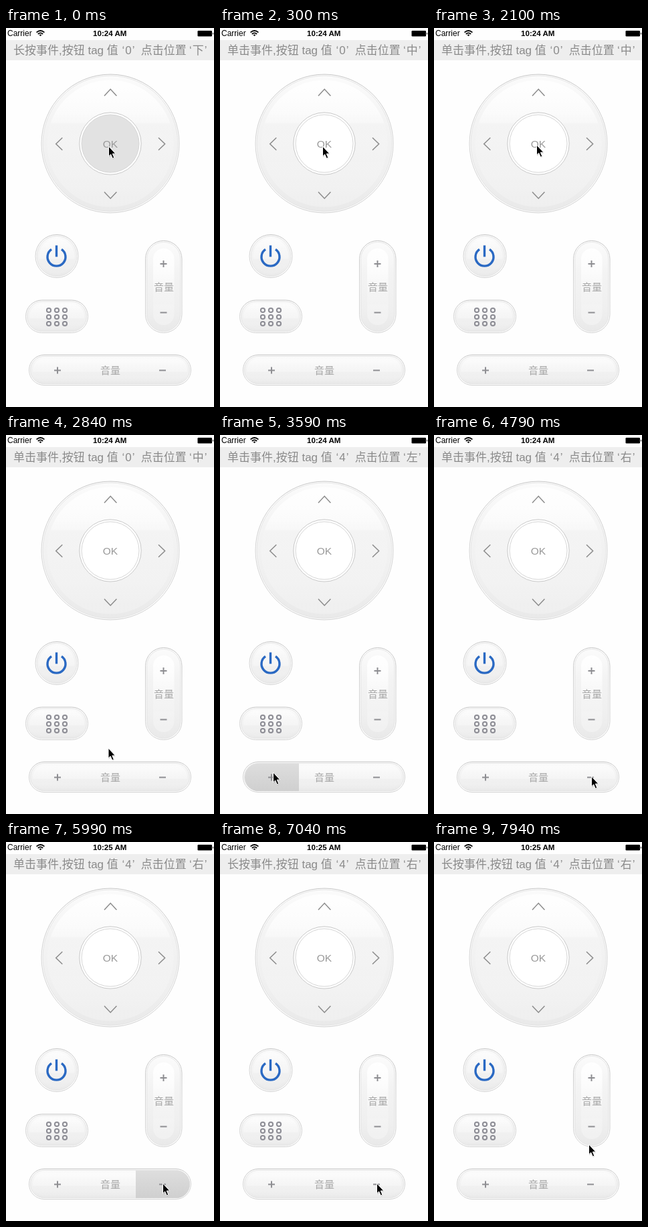
An HTML page that plays this animation: 311x564 px, repeating every 8000 ms.

```html
<!DOCTYPE html>
<html lang="zh-CN">
<head>
<meta charset="utf-8">
<title>Remote control</title>
<style>
html, body { margin: 0; width: 100%; height: 100%; overflow: hidden; background: #fefefe; }
svg { display: block; font-family: "Liberation Sans", "Noto Sans CJK SC", "Noto Sans CJK", sans-serif; }
.line { fill: none; stroke: #8c8c8c; stroke-width: 1.5; }
.sign { fill: none; stroke: #8e8e92; stroke-width: 2; }
.volume { font-size: 15px; fill: #a9a9a9; text-anchor: middle; }
.label { font-size: 17px; fill: #8a8a8a; white-space: pre; }
.quoted { letter-spacing: 1px; }
</style>
</head>
<body>
<svg id="stage" width="311" height="564" viewBox="0 0 311 564"></svg>
<script>
const LOOP = 8000;

// Raised button: thin rim, white gap, shaded body and a soft highlight.
function button(x, y, w, h, inset, glow) {
  const box = (gap, attrs) => {
    const bw = w - 2 * gap, bh = h - 2 * gap;
    return `<rect x="${x + gap}" y="${y + gap}" width="${bw}" height="${bh}" rx="${Math.min(bw, bh) / 2}" ${attrs}/>`;
  };
  return box(.5, 'fill="#fff" stroke="url(#rim)"') +
    box(2.5, 'fill="url(#body)" stroke="#dedede" stroke-width=".8"') +
    box(inset, `fill="url(#${glow})"`);
}
const plus = (x, y) => `<path class="sign" d="M${x - 5} ${y}h10M${x} ${y - 5}v10"/>`;
const minus = (x, y) => `<path class="sign" d="M${x - 5} ${y}h10"/>`;
const volume = (x, y) => `<text class="volume" x="${x}" y="${y}">音量</text>`;
const gradient = (id, stops) => `<linearGradient id="${id}" x2="0" y2="1">` +
  stops.map(([at, color, alpha = 1]) => `<stop offset="${at}" stop-color="${color}" stop-opacity="${alpha}"/>`).join('') +
  '</linearGradient>';

let dots = '';
for (let i = 0; i < 9; i++) {
  dots += `<circle cx="${64 + i % 3 * 12}" cy="${420 + Math.floor(i / 3) * 10}" r="3.1"/>`;
}

const stage = document.getElementById('stage');
stage.innerHTML = `
<defs>
  ${gradient('rim', [[0, '#c4c4c4'], [.5, '#d2d2d2'], [1, '#d0d0d0']])}
  ${gradient('body', [[0, '#fbfbfb'], [.35, '#f3f3f3'], [.75, '#efefef'], [1, '#e9e9e9']])}
  ${gradient('dialGlow', [[0, '#fff', .9], [.25, '#fff', .6], [.33, '#fff', .4], [.35, '#fff', .1], [1, '#fff', .25]])}
  ${gradient('barGlow', [[0, '#fff', .5], [.55, '#fff', .3], [.6, '#fff', 0], [1, '#fff', .1]])}
  ${gradient('tallGlow', [[0, '#fff', .95], [.3, '#fff', .7], [.6, '#fff', .2], [1, '#fff', .3]])}
  ${gradient('held', [[0, '#dedede'], [.4, '#d8d8d8'], [1, '#cfcfcf']])}
  <clipPath id="bar"><rect x="37" y="488.5" width="238" height="41.5" rx="20.7"/></clipPath>
</defs>
<rect width="311" height="564" fill="#fefefe"/>
<text x="2" y="12.3" font-size="12">Carrier</text>
<g fill="none" stroke="#000" stroke-width="1.8">
  <path d="M45.6 6.6Q51.5 1.4 57.4 6.6M47.8 9Q51.5 5.8 55.2 9"/>
  <path d="M49.6 10.2Q51.5 8.8 53.4 10.2L51.5 12.3Z" fill="#000" stroke="none"/>
</g>
<text id="clock" x="130" y="12.3" font-size="11.6" font-weight="bold"></text>
<rect x="286.5" y="4" width="21.5" height="8.5" rx="1.3"/>
<path d="M309 6.5q2 1.8 0 3.6z"/>
<rect y="18" width="311" height="30" fill="#eee"/>
<text id="event" class="label" x="11" y="39"></text>
<text id="tag" class="label quoted" x="173.5" y="39"></text>
<text class="label" x="201.7" y="39">点击位置</text>
<text id="place" class="label quoted" x="274" y="39"></text>

${button(52.5, 68.5, 207, 207, 9, 'dialGlow')}
<circle cx="156" cy="172" r="46.2" fill="#fff" stroke="#c8c8c8"/>
<circle id="center" cx="156" cy="172" r="43" fill="#fff" stroke="#d6d6d6"/>
<path class="line" d="M147 101l9.2-10 9.2 10M147 244l9.2 9.7 9.2-9.7M84.3 163.3l-9.6 9.2 9.6 9.2M228 163.3l9.6 9.2-9.6 9.2"/>
<text x="156" y="178" font-size="15.5" fill="#999" text-anchor="middle">OK</text>

${button(43.5, 307, 65, 65, 6, 'barGlow')}
<path d="M68 329.4A13.5 13.5 0 1 0 83 329.4M75.5 323.5v17" fill="none" stroke="#2a69c3" stroke-width="3.4"/>

${button(29, 404.5, 94, 49.5, 6, 'barGlow')}
<g fill="none" stroke="#8d8d95" stroke-width="2">${dots}</g>

${button(208, 316, 55.5, 138, 12, 'tallGlow')}
${plus(235.5, 351)}${volume(236, 391)}${minus(235.5, 423.5)}

${button(34, 486, 243, 46, 6, 'barGlow')}
<g clip-path="url(#bar)" fill="url(#held)">
  <rect id="left" x="37" y="488" width="81" height="43"/>
  <rect id="right" x="194" y="488" width="82" height="43"/>
</g>
${plus(77, 509.5)}${volume(156, 514.7)}${minus(234, 509.5)}

<g id="cursor">
  <path d="M.5 1v14.3l3.2-2.9 2.5 5.6 2.5-1-2.4-5.5h4.4z" fill="#000" opacity=".2" transform="translate(.5 1)"/>
  <path d="M.5 0v15l3.2-3 2.6 6 2.5-1-2.5-5.9h4.5z" stroke="#fff"/>
</g>`;

// [time, x, y] of the pointer
const pointer = [
  [0, 153, 176], [1200, 155, 173], [1350, 153, 171], [2100, 153, 174], [2250, 153, 176],
  [2550, 154, 250], [2700, 154, 400], [2840, 152.5, 466], [2990, 104, 496], [3140, 79, 502],
  [3890, 126, 506], [4040, 212, 509], [4190, 235, 508], [5240, 234, 508],
  [7790, 233, 478], [7940, 231, 450]
];
// [time, held part]
const holds = [
  [0, 'center'], [150, ''], [3290, 'left'], [3440, ''], [3590, 'left'], [3740, ''],
  [4490, 'right'], [4790, ''], [5540, 'right'], [7040, '']
];
// [time, event, tag, position]
const messages = [
  [0, '长按', 0, '下'], [150, '单击', 0, '中'], [3440, '单击', 4, '左'],
  [4790, '单击', 4, '右'], [7040, '长按', 4, '右']
];
const clocks = [[0, '10:24 AM'], [5990, '10:25 AM']];

const at = (steps, t) => steps.findLast(step => step[0] <= t);
const el = id => document.getElementById(id);
function setText(id, text) {
  if (el(id).textContent !== text) el(id).textContent = text;
}

function draw(t) {
  const [, x, y] = at(pointer, t);
  const [, held] = at(holds, t);
  const [, event, tag, place] = at(messages, t);
  el('cursor').setAttribute('transform', `translate(${x} ${y})`);
  el('center').setAttribute('fill', held === 'center' ? '#e2e2e2' : '#fff');
  for (const side of ['left', 'right']) el(side).setAttribute('opacity', held === side ? 1 : 0);
  setText('event', `${event}事件,按钮 tag 值`);
  setText('tag', `‘${tag}’`);
  setText('place', `‘${place}’`);
  setText('clock', at(clocks, t)[1]);
}

const start = performance.now();
function tick() {
  draw((performance.now() - start) % LOOP);
  requestAnimationFrame(tick);
}
tick();
</script>
</body>
</html>
```
